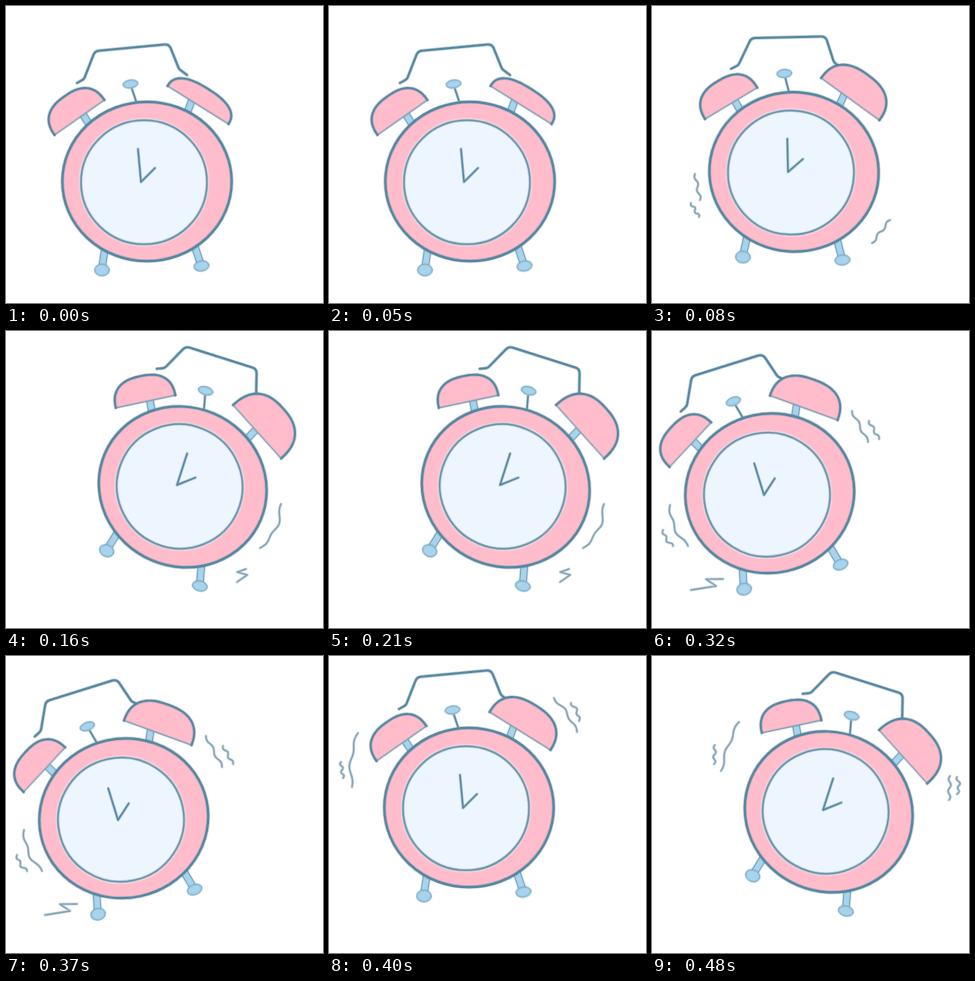
These frames come from a looping animation (317 by 297 pixels, 560 ms). An HTML page with a canvas:

```html
<!DOCTYPE html>
<html lang="en">
<head>
<meta charset="utf-8">
<title>Ringing alarm clock</title>
<style>
  html, body { margin: 0; width: 100%; height: 100%; overflow: hidden; background: #fff; }
  canvas { display: block; width: 317px; height: 297px; }
</style>
</head>
<body>
<canvas id="stage"></canvas>
<script>
const WIDTH = 317, HEIGHT = 297, STEP = 80;
const LINE = '#5385a0', PINK = '#ffbdcc', FACE = '#edf6fe', BLUE = '#a8d3ec', SHAKE = '#7fa1b5';
const rad = degrees => degrees * Math.PI / 180;

const canvas = document.getElementById('stage');
const ratio = window.devicePixelRatio || 1;
canvas.width = WIDTH * ratio;
canvas.height = HEIGHT * ratio;
const ctx = canvas.getContext('2d');

function polyline(pts) {
  const path = new Path2D();
  pts.forEach(p => path.lineTo(...p));
  return path;
}

function rounded(pts, radius) {
  const path = new Path2D();
  path.moveTo(...pts[0]);
  for (let i = 1; i < pts.length - 1; i++) path.arcTo(...pts[i], ...pts[i + 1], radius);
  path.lineTo(...pts.at(-1));
  return path;
}

function oval(x, y, rx, ry, turn = 0) {
  const path = new Path2D();
  path.ellipse(x, y, rx, ry, rad(turn), 0, Math.PI * 2);
  return path;
}

// Point at t along a to b, moved sideways by off.
function beside([ax, ay], [bx, by], t, off) {
  const dx = bx - ax, dy = by - ay, length = Math.hypot(dx, dy);
  return [ax + dx * t - dy / length * off, ay + dy * t + dx / length * off];
}

function wave(a, b, bow = 0) {
  const pts = [];
  for (let t = 0; t <= 1.001; t += 1 / 16) {
    pts.push(beside(a, b, t, bow * Math.sin(Math.PI * t) + 1.3 * Math.sin(Math.PI * 4 * t)));
  }
  return polyline(pts);
}

const zigzag = (a, b) => polyline([a, beside(a, b, .48, 5.5), beside(a, b, .26, -4.4), b]);

// Half a squared-off oval standing on its flat side.
function dome(halfWidth, height) {
  const bend = v => Math.sign(v) * Math.abs(v) ** .8;
  const pts = [];
  for (let i = 0; i <= 32; i++) {
    const a = Math.PI * i / 32;
    pts.push([-halfWidth * bend(Math.cos(a)), -height * bend(Math.sin(a))]);
  }
  return polyline(pts);
}

// x, y: pivot of the hands; swell: height of the right bell; lean: its extra swing.
const tilted = { x: 171, y: 154, turn: 23, swell: 35, lean: -7 };
const POSES = [
  { x: 135, y: 176, turn: 0, swell: 19, shakes: [] },
  { x: 136, y: 166, turn: 4, swell: 30, shakes: [
    wave([43, 168], [48, 194]), wave([39, 197], [47, 211]), wave([238, 214], [220, 237])] },
  { ...tilted, shakes: [wave([275, 173], [254, 217], -6), zigzag([240, 238], [231, 251])] },
  { x: 141, y: 146, turn: 0, swell: 19, shakes: [] },
  { x: 112, y: 164, turn: -12, swell: 30, shakes: [
    wave([200, 80], [216, 111]), wave([217, 90], [227, 108]),
    wave([18, 174], [36, 215], 5), wave([11, 199], [21, 215], 2), zigzag([71, 248], [39, 259])] },
  { x: 134, y: 152, turn: 0, swell: 30, shakes: [
    wave([225, 42], [248, 76], -2), wave([242, 47], [250, 65], -2),
    wave([29, 77], [23, 131], 4), wave([12, 106], [14, 122])] },
  { ...tilted, shakes: [
    wave([87, 66], [69, 115], 2), wave([63, 89], [62, 108]),
    wave([298, 120], [297, 144]), wave([305, 121], [305, 138], -2)] }
];

function fill(path, color) {
  ctx.fillStyle = color;
  ctx.fill(path);
}

// Brush line: a firm core with a soft edge.
function line(path, width = 2.6, color = LINE) {
  ctx.strokeStyle = color;
  ctx.globalAlpha = .4;
  ctx.lineWidth = width + .9;
  ctx.stroke(path);
  ctx.globalAlpha = 1;
  ctx.lineWidth = width - .6;
  ctx.stroke(path);
}

function rod(from, to) {
  const path = polyline([from, to]);
  ctx.lineCap = 'butt';
  line(path, 8, '#6f9fb9');
  ctx.strokeStyle = BLUE;
  ctx.lineWidth = 5.6;
  ctx.stroke(path);
  ctx.lineCap = 'round';
}

function knob(...shape) {
  const path = oval(...shape);
  fill(path, BLUE);
  line(path, 1.4, '#7fadc7');
}

function bell(x, y, turn, halfWidth, height) {
  ctx.save();
  ctx.translate(x, y);
  ctx.rotate(rad(turn));
  const shell = dome(halfWidth, height);
  fill(shell, PINK);
  line(polyline([[-halfWidth, 0], [halfWidth, 0]]), 1.5, '#7c9db2');
  line(shell, 2.5);
  ctx.restore();
}

function drawClock({ x, y, turn, swell, lean = 0 }) {
  ctx.save();
  ctx.translate(x, y);
  ctx.rotate(rad(turn));

  line(rounded([[-64, -99], [-57, -103], [-46, -131], [28, -138], [38, -113], [46, -107]], 6));
  rod([-61, -72], [-50, -55]);
  rod([51, -82], [45, -66]);
  rod([-36, 66], [-39, 86]);
  knob(-39, 88, 7.3, 5.8);
  rod([53, 62], [60, 83]);
  knob(60.5, 84, 7.5, 5, -10);

  bell(-61.5, -64.5, -35, 30.5, 26);
  ctx.save();
  ctx.translate(28, -45);
  ctx.rotate(rad(lean));
  bell(29, -32, 32, 36, swell);
  ctx.restore();

  const rim = oval(6, -.5, 84.7, 79.7), dial = oval(3, .3, 63, 62);
  fill(rim, PINK);
  line(rim, 2.8);
  line(dial, 4, '#f6e6ee');
  fill(dial, FACE);
  line(dial, 2.1, '#6792aa');

  line(polyline([[-3, -33], [0, 0], [14, -14]]), 2.1);
  line(polyline([[-9, -93], [-5, -81]]), 2.1);
  knob(-10.5, -98, 7.4, 4, -8);
  ctx.restore();
}

function draw(time) {
  const pose = POSES[Math.floor(time / STEP) % POSES.length];
  ctx.setTransform(ratio, 0, 0, ratio, 0, 0);
  ctx.fillStyle = '#fff';
  ctx.fillRect(0, 0, WIDTH, HEIGHT);
  ctx.lineCap = ctx.lineJoin = 'round';
  drawClock(pose);
  pose.shakes.forEach(path => line(path, 2, SHAKE));
}

let start;
function tick(time) {
  start ??= time;
  draw(time - start);
  requestAnimationFrame(tick);
}
draw(0);
requestAnimationFrame(tick);
</script>
</body>
</html>
```
